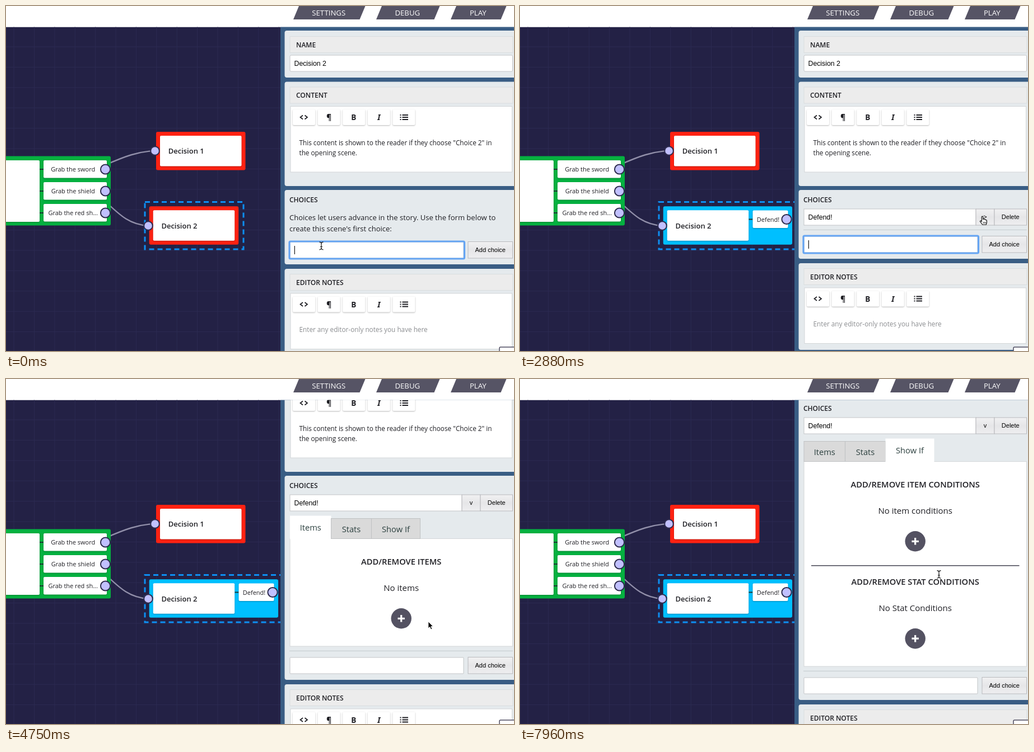
An HTML page that plays this animation: 907 by 617 pixels, repeating every 8 s.

```html
<!DOCTYPE html>
<html lang="en">
<head>
<meta charset="utf-8">
<title>Story editor</title>
<style>
html, body { margin: 0; width: 100%; height: 100%; overflow: hidden; background: #fff; }
svg { display: block; width: 907px; height: 617px; font-family: "Open Sans", "Noto Sans", sans-serif; }
text { white-space: pre; }
.ui { font-family: "Liberation Sans", Arial, sans-serif; }
.lift { filter: drop-shadow(0 1px 1px rgba(0, 0, 0, .28)); }
.mid { text-anchor: middle; }
</style>
</head>
<body>
<svg id="stage" viewBox="0 0 907 617" xmlns="http://www.w3.org/2000/svg"></svg>
<script>
const LOOP = 8000;
const FIELD = 'fill="#fff" stroke="#c3c5c8"';
const INK = '#1f1f24';

// Markup helpers
const rect = (x, y, w, h, attrs = '') => `<rect x="${x}" y="${y}" width="${w}" height="${h}" ${attrs}/>`;
const path = (d, attrs = '') => `<path d="${d}" fill="none" ${attrs}/>`;
const text = (x, y, size, str, attrs = '') =>
  `<text x="${x}" y="${y}" font-size="${size}" ${attrs.includes('fill=') ? '' : `fill="${INK}"`} ${attrs}>${str}</text>`;
const ui = (x, y, size, str, attrs = '') => text(x, y, size, str, `class="ui" fill="#000" ${attrs}`);
const group = (id, body, attrs = '') => `<g id="${id}" ${attrs}>${body}</g>`;
const port = (x, y, r) => `<circle cx="${x}" cy="${y}" r="${r}" fill="#c1c0ff" stroke="#2d2b4d" stroke-width="2"/>`;

const button = (x, y, w, h, label) =>
  rect(x, y, w, h, 'fill="url(#btn)" stroke="#b9babd"') +
  (label ? ui(x + w / 2, y + h / 2 + 3.7, 11, label, 'text-anchor="middle"') : '');

const card = (y, h, attrs = '') => rect(497.5, y, 420, h, `rx="4" fill="#e5eaed" ${attrs}`);

const heading = (y, label) =>
  rect(507, y, 398, 29, 'fill="#ececec" stroke="#d9dddf"') +
  text(518, y + 19.2, 12, label, 'font-weight="600"');

function toolbar(y) {
  const cy = y + 14;
  let out = '';
  for (let i = 0; i < 5; i++) out += rect(512 + i * 44.6, y, 40, 28, 'rx="2" fill="#fff" class="lift"');
  out += path(`M530 ${cy - 3.5}l-4.5 3.5 4.5 3.5M533.5 ${cy - 3.5}l4.5 3.5 -4.5 3.5`, `stroke="${INK}" stroke-width="1.7"`);
  out += text(576.5, cy + 5, 14, '¶', 'class="mid" font-weight="700"');
  out += text(620.7, cy + 5, 13.5, 'B', 'class="mid" font-weight="700"');
  out += text(665.8, cy + 5, 13.5, 'I', 'class="mid" font-weight="700" font-style="italic" font-family="Noto Sans, sans-serif"');
  for (const dy of [-4, 0, 4])
    out += path(`M703.5 ${cy + dy}h2M707.5 ${cy + dy}h10.5`, `stroke="${INK}" stroke-width="2"`);
  return out;
}

const plus = (y) =>
  `<circle cx="705.7" cy="${y}" r="18.2" fill="#545262"/>` +
  path(`M699.5 ${y}h12.4M705.7 ${y - 6.2}v12.4`, 'stroke="#fff" stroke-width="3.2"');

const section = (y, title, note) =>
  text(705.7, y + 5.3, 14.7, title, 'class="mid" font-weight="600"') +
  text(705.7, y + 53, 15, note, 'class="mid"') +
  plus(y + 102);

function tabs(active) {
  const edges = [507, 580.5, 652.5, 739.5];
  return ['Items', 'Stats', 'Show If'].map((label, i) => {
    const on = i === active, x = edges[i], w = edges[i + 1] - x;
    return rect(x, on ? 400.5 : 405.5, w, on ? 42 : 36, on ? 'fill="#fff"' : 'fill="#dadada" stroke="#bfc1c3"') +
      text(x + w / 2, on ? 427 : 429.5, 14.7, label, 'class="mid" fill="#2c403f"');
  }).join('');
}

const tabPane = (active, bottom, body) =>
  rect(507, 441.5, 397.5, bottom - 441.5, 'fill="#fff" stroke="#d3d6d8"') + tabs(active) + body;

// Story map
function grid() {
  let d = '';
  for (let x = 14; x < 490; x += 36.4) d += `M${x} 37V617`;
  for (let y = 73; y < 617; y += 36.4) d += `M0 ${y}H490`;
  return path(d, 'stroke="#2c2a52"');
}

const node = (x, y, label) =>
  rect(x + 7, y + 7, 145.5, 54.5, 'rx="2" fill="#fff" class="lift"') +
  text(x + 21.7, y + 39.3, 13, label, 'font-weight="600"');

const option = (x, y, w, label, mid) =>
  path(`M${x - 7} ${y + 16}h7`, 'stroke="#1c3a35" stroke-width="2"') +
  rect(x, y, w, 31.5, 'rx="2" fill="#fff" class="lift"') +
  text(mid, y + 20, 11, label, 'class="mid"') + port(x + w - 2.5, y + 16, 8.6);

const map =
  rect(0, 37.5, 490, 580, 'fill="#232145"') + grid() +
  path('M178 284C212 269 236 260 266 259M178 350C205 376 222 391 254 393', 'stroke="#918fa9" stroke-width="2.4"') +
  rect(-10, 268.5, 197, 124, 'rx="3" fill="#05b140"') +
  rect(-10, 276, 70, 110, 'rx="2" fill="#fff" class="lift"') +
  option(67, 276, 113, 'Grab the sword', 119.7) +
  option(67, 315, 113, 'Grab the shield', 119.7) +
  option(67, 354, 113, 'Grab the red sh...', 119.7) +
  rect(268, 225, 159.5, 68.5, 'rx="3" fill="#ff2212"') + node(268, 225, 'Decision 1') + port(266, 259, 7.8) +
  rect(255.7, 358.3, 159.5, 68.5, 'id="body" rx="3"') + node(255.7, 358.3, 'Decision 2') +
  rect(248, 350.5, 176, 84.5, 'id="outline" fill="none" stroke="#0d8ff2" stroke-width="3" stroke-dasharray="9 6"') +
  port(254, 393, 7.8) +
  group('reply', option(415.5, 365.5, 63, 'Defend!', 443));

// Side panel, in unscrolled coordinates
const panel =
  card(44, 84) + heading(54.5, 'NAME') +
  rect(507, 88, 397.5, 29, 'rx="2" ' + FIELD) + ui(514.5, 106.8, 12.3, 'Decision 2') +
  card(135.5, 186.5) + heading(145, 'CONTENT') +
  rect(508, 179.5, 395.5, 117.5, 'fill="#fff" stroke="#d3d6d8"') + toolbar(185) +
  text(523.5, 248.7, 11.75, 'This content is shown to the reader if they choose "Choice 2" in') +
  text(523.5, 266.7, 11.75, 'the opening scene.') +
  card(329, 133, 'id="choices"') +
  text(506, 351, 12, 'CHOICES', 'font-weight="600"') +
  group('intro',
    text(506, 383, 13, 'Choices let users advance in the story. Use the form below to') +
    text(506, 403, 13, 'create this scene\'s first choice:')) +
  group('row',
    rect(507, 363, 307, 29, FIELD) + ui(514.5, 382, 12.3, 'Defend!') +
    button(814, 363, 33, 29) + ui(830.5, 381, 11, '', 'id="toggle" text-anchor="middle"') +
    button(847, 363, 57.5, 29, 'Delete')) +
  group('items', tabPane(0, 634, section(482.3, 'ADD/REMOVE ITEMS', 'No items'))) +
  group('showif', tabPane(2, 808,
    section(482.3, 'ADD/REMOVE ITEM CONDITIONS', 'No item conditions') +
    path('M520 627.7H891.5', 'stroke="#454452" stroke-width="1.5"') +
    section(656.2, 'ADD/REMOVE STAT CONDITIONS', 'No Stat Conditions'))) +
  group('below',
    path('M506 410.3H905', 'id="rule" stroke="#c4cacd"') +
    rect(507, 422, 310, 29, 'rx="1" ' + FIELD) +
    rect(506, 421, 312.5, 31, 'id="ring" rx="2" fill="none" stroke="#65a5f3" stroke-width="3.2"') +
    button(825, 421.5, 79.5, 29.5, 'Add choice') +
    ui(514.5, 441, 12.3, '', 'id="typed"') +
    path('M0 429v15', 'id="caret" stroke="#000" stroke-width="1.1"') +
    card(470, 155) + heading(479.5, 'EDITOR NOTES') +
    rect(508, 514, 395.5, 99.5, 'fill="#fff" stroke="#d3d6d8"') + toolbar(519.5) +
    text(523.5, 583, 11.75, 'Enter any editor-only notes you have here', 'fill="#8b8d90"')) +
  group('list',
    rect(506, 451, 310, 18.5, 'id="listbox" fill="#fff" stroke="#c9c9c9" class="lift"') +
    ui(510, 464.6, 11.6, 'Defend!') +
    group('more', ['Dodge', 'Distract', 'Duck', 'Do nothing'].map((s, i) => ui(510, 480.3 + i * 15.7, 11.6, s)).join('')));

const menu = [['SETTINGS', 513, 118.5], ['DEBUG', 661, 103.5], ['PLAY', 794, 89.5]].map(([label, x, w]) =>
  `<path d="M${x} 24l10 -24h${w}l-10 24z" fill="#565465"/>` +
  text(x + 5 + w / 2 - 1, 16.6, 13.2, label, 'class="mid" fill="#fff"')).join('');

// Pointers, with the hot spot at 0,0
const pointers =
  group('beam', path('M-3.5 -6.8Q0 -6.5 0 -4Q0 -6.5 3.5 -6.8M0 -5V5M-3.5 6.8Q0 6.5 0 4Q0 6.5 3.5 6.8M-2 1.5H2', 'stroke="#111" stroke-width="1.2"')) +
  group('arrow', '<path d="M0 0V12.4L2.8 9.8 4.8 14.3 7 13.3 5 9H8.8Z" fill="#000" stroke="#fff" stroke-width="1"/>') +
  group('hand', '<path d="M-1.2 1Q0 -.8 1.2 1V5.5L2 5Q3.4 4.6 3.8 5.8 5.3 5.2 5.9 6.6 7.7 6.2 7.9 8V11Q7.4 13 6.8 15H.2L-4 9.5Q-4.3 7.9 -2.7 8.1L-1.2 9.4Z" fill="#fff" stroke="#111" stroke-width="1.2"/>' +
    path('M1.8 10v3M3.8 10v3M5.7 10v3', 'stroke="#111" stroke-width=".8"'));

const stage = document.getElementById('stage');
stage.innerHTML =
  '<defs><clipPath id="mapClip">' + rect(0, 37.5, 490, 580) + '</clipPath>' +
  '<clipPath id="panelClip">' + rect(490, 37.5, 417, 580) + '</clipPath>' +
  '<linearGradient id="btn" x2="0" y2="1"><stop stop-color="#f1f1f2"/><stop offset=".5" stop-color="#e6e6e8"/><stop offset="1" stop-color="#eeeef0"/></linearGradient></defs>' +
  rect(0, 0, 907, 617, 'fill="#fff"') + menu +
  `<g clip-path="url(#mapClip)">${map}</g>` +
  `<g clip-path="url(#panelClip)">${rect(490, 37, 417, 580, 'fill="#395d84"')}${group('panel', panel)}</g>` +
  rect(881, 610, 40, 20, 'rx="2" fill="#fff" stroke="#4d4b60" stroke-width="1.5"') +
  group('mouse', pointers);

const ui$ = {};
stage.querySelectorAll('[id]').forEach((el) => { ui$[el.id] = el; });
const show = (id, on) => ui$[id].setAttribute('display', on ? 'inline' : 'none');
const move = (id, x, y) => ui$[id].setAttribute('transform', `translate(${x} ${y})`);

// Timeline tables: [time, value...]
const ADD = 1820, OPEN = 3220, TAB = 6220;
const TYPING = [[0, ''], [710, 'D'], [890, 'De'], [1000, 'Def'], [1060, 'Defe'], [1150, 'Defen'], [1290, 'Defend'], [1530, 'Defend!'], [ADD, '']];
const CARET = [[0, 1], [510, 0], [710, 1], [1640, 0], [ADD, 1], [2300, 0], [2760, 1], [OPEN, 0]];
const SCROLL = [[0, 0], [4100, 8], [4160, 29], [4210, 54], [4270, 80], [4330, 108], [4390, 133], [4450, 149], [4510, 156],
  [6990, 168], [7040, 190], [7090, 212], [7140, 231.5], [7200, 250], [7260, 264], [7320, 275], [7380, 283], [7460, 290], [7540, 294]];
const POINTER = [[0, 'beam'], [2350, 'arrow'], [2830, 'hand'], [3690, 'arrow'], [5560, 'hand'], [6630, 'arrow'], [7460, 'beam']];
const MOUSE = [[0, 563, 429], [2130, 563, 429], [2470, 671, 398], [2610, 671, 398], [2880, 825.5, 376], [3640, 825.5, 376],
  [3870, 754.5, 435.5], [4700, 754.5, 435.5], [5500, 704.5, 275], [6580, 704.5, 275], [6750, 752, 356.5], [7920, 752, 356.5],
  [7960, 748, 349.5], [LOOP, 748, 349.5]];

const held = (table, t) => table.findLast((k) => k[0] <= t)[1];
function between(table, t) {
  const i = table.findIndex((k) => k[0] > t);
  const a = table[i - 1], b = table[i];
  const p = (t - a[0]) / (b[0] - a[0]);
  const e = p * p * (3 - 2 * p);
  return [a[1] + (b[1] - a[1]) * e, a[2] + (b[2] - a[2]) * e];
}

function draw(t) {
  const added = t >= ADD, open = t >= OPEN, tab = t >= TAB, scroll = held(SCROLL, t);
  const shift = !added ? 0 : !open ? -10 : tab ? 406 : 232;

  move('panel', 0, -scroll);
  move('below', 0, shift);
  ui$.choices.setAttribute('height', 133 + shift);
  show('intro', !added);
  show('row', added);
  show('rule', added);
  show('items', open && !tab);
  show('showif', tab);
  show('ring', !open);
  ui$.toggle.textContent = open ? 'v' : '>';

  const typed = held(TYPING, t);
  ui$.typed.textContent = typed;
  show('caret', held(CARET, t));
  move('caret', 515.3 + (typed ? ui$.typed.getComputedTextLength() : 0), 0);
  show('list', t >= 780 && !added);
  show('more', typed === 'D');
  ui$.listbox.setAttribute('height', typed === 'D' ? 81 : 18.5);

  ui$.body.setAttribute('fill', added ? '#00bfff' : '#ff2212');
  ui$.body.setAttribute('width', added ? 230.3 : 159.5);
  ui$.outline.setAttribute('width', added ? 246 : 176);
  show('reply', added);

  const kind = held(POINTER, t);
  for (const k of ['beam', 'arrow', 'hand']) show(k, k === kind);
  move('mouse', ...between(MOUSE, t));
}

const start = performance.now();
function tick() {
  draw((performance.now() - start) % LOOP);
  requestAnimationFrame(tick);
}
tick();
</script>
</body>
</html>
```
